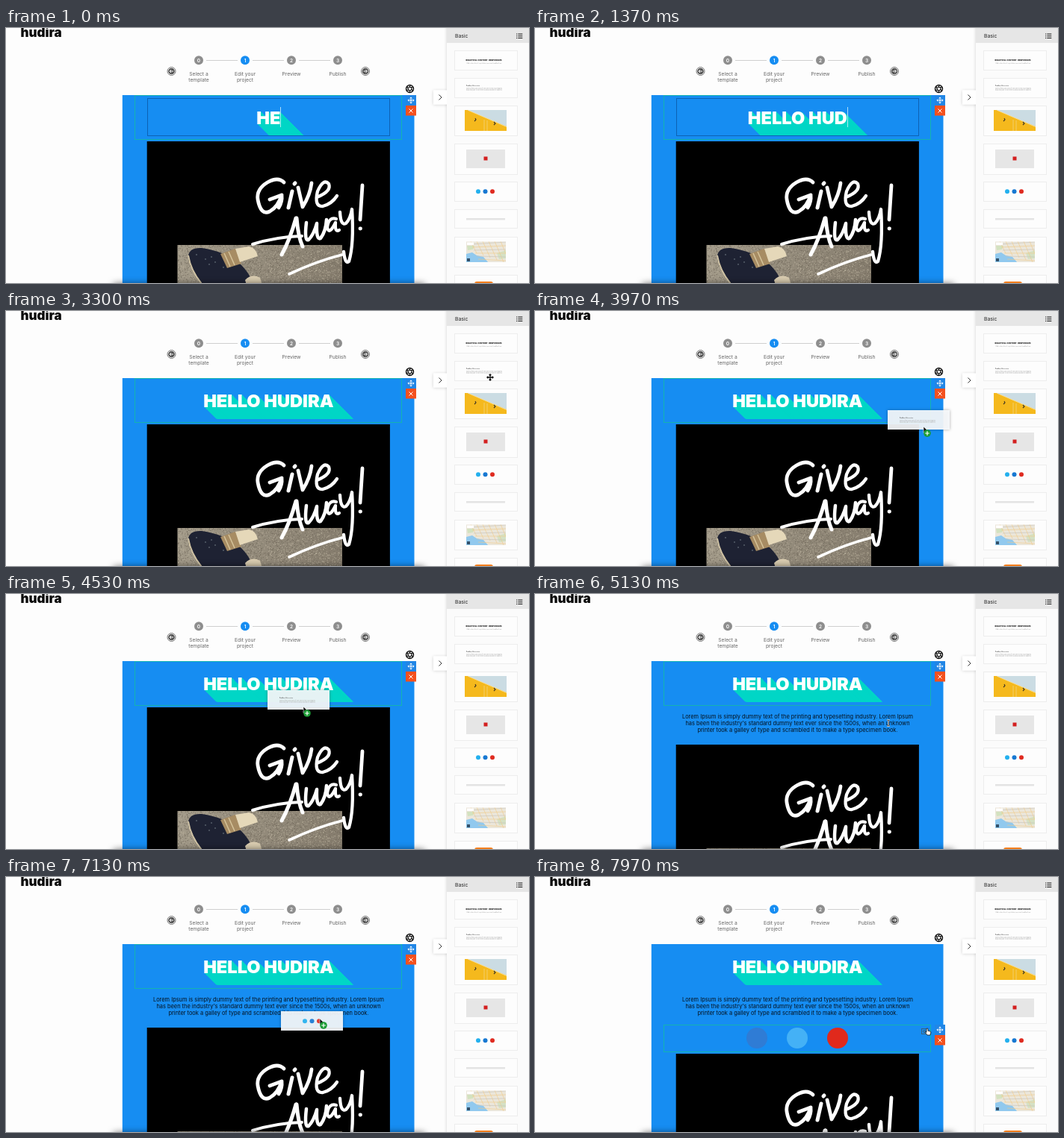
Recreate the animation shown at these times as an HTML page with a canvas. Size 700 by 342 pixels, loop 8 s.

```html
<!DOCTYPE html>
<html lang="en">
<head>
<meta charset="utf-8">
<title>Newsletter editor</title>
<style>
html, body { margin: 0; width: 100%; height: 100%; overflow: hidden; background: #fdfdfd; }
canvas { display: block; width: 700px; height: 342px; }
</style>
</head>
<body>
<canvas id="stage"></canvas>
<script>
const W = 700, H = 342, LOOP = 8000;
const BLUE = '#168df2', RED = '#f4511e', TEAL = '#00d6c6', GREEN = '#14b3b0';
const TITLE = 'HELLO HUDIRA';
const TITLE_FONT = '900 23.6px Inter, sans-serif';
const LOREM = [
  'Lorem Ipsum is simply dummy text of the printing and typesetting industry. Lorem Ipsum',
  "has been the industry's standard dummy text ever since the 1500s, when an unknown",
  'printer took a galley of type and scrambled it to make a type specimen book.'
];

// Times (ms) at which the letters after "HE" are typed
const KEYS = [100, 270, 390, 620, 850, 1030, 1220, 1400, 1570, 1740];
const BLUR = 2900, DROP_TEXT = 4560, DROP_SOCIAL = 7240, HOVER_SOCIAL = 7380;
const DRAGS = [
  { from: 3330, to: DROP_TEXT, dx: -48, dy: -22, draw: textCard },
  { from: 6420, to: DROP_SOCIAL, dx: -52, dy: -10, draw: socialCard }
];
// Pointer path: time, x, y
const PATH = [
  [2050, 440, 118], [2450, 497, 98], [2560, 497, 98], [3150, 648, 89], [3330, 648, 89],
  [3900, 522, 154], [3970, 520, 155], [4450, 398, 151], [4620, 398, 151], [5050, 473, 173],
  [5180, 473, 173], [6080, 652, 216], [6420, 652, 216], [7130, 420, 190], [7290, 420, 190],
  [7820, 524, 207], [8000, 524, 207]
];

const canvas = document.getElementById('stage');
const c = canvas.getContext('2d');
const ratio = window.devicePixelRatio || 1;
canvas.width = W * ratio;
canvas.height = H * ratio;

function rect(x, y, w, h, color) {
  c.fillStyle = color;
  c.fillRect(x, y, w, h);
}

function box(x, y, w, h, color) {
  c.strokeStyle = color;
  c.lineWidth = 1;
  c.strokeRect(x + 0.5, y + 0.5, w - 1, h - 1);
}

function disc(x, y, r, color) {
  c.fillStyle = color;
  c.beginPath();
  c.arc(x, y, r, 0, 7);
  c.fill();
}

function ring(x, y, r, color, width) {
  c.strokeStyle = color;
  c.lineWidth = width;
  c.beginPath();
  c.arc(x, y, r, 0, 7);
  c.stroke();
}

function line(d, color, width) {
  c.strokeStyle = color;
  c.lineWidth = width;
  c.stroke(new Path2D(d));
}

function shape(d, color) {
  c.fillStyle = color;
  c.fill(new Path2D(d));
}

function text(str, x, y, size, color, align = 'center', weight = 400) {
  c.font = `${weight} ${size}px Inter, sans-serif`;
  c.fillStyle = color;
  c.textAlign = align;
  c.fillText(str, x, y);
}

function at(x, y, draw) {
  c.save();
  c.translate(x, y);
  draw();
  c.restore();
}

function withShadow(color, blur, draw) {
  c.save();
  c.shadowColor = color;
  c.shadowBlur = blur * ratio;
  draw();
  c.restore();
}

function stepper() {
  const labels = [['Select a', 'template'], ['Edit your', 'project'], ['Preview'], ['Publish']];
  labels.forEach((rows, i) => {
    const x = 258 + i * 62;
    if (i < 3) line(`M${x + 10} 43.5H${x + 52}`, '#cfcfcf', 1);
    disc(x, 43.3, 6, i === 1 ? BLUE : '#8e8e8e');
    text(String(i), x, 45.7, 6.5, '#fff', 'center', 600);
    rows.forEach((row, j) => text(row, x, 64 + j * 8.3, 6.7, '#666'));
  });
  [[221.5, -1], [481, 1]].forEach(([x, dir]) => at(x, 58, () => {
    ring(0, 0, 5.5, '#777', 1);
    disc(0, 0, 4.3, '#555');
    c.scale(dir, 1);
    line('M-2.5 0H2.5M.4 -2.1L2.5 0L.4 2.1', '#fff', 1);
  }));
}

function aperture() {
  at(540.5, 81.5, () => {
    ring(0, 0, 5, '#111', 1.4);
    for (let i = 0; i < 6; i++) {
      line('M4.6 -1.5L-.8 -2.4', '#111', 1.1);
      c.rotate(Math.PI / 3);
    }
  });
}

function moveIcon(x, y, color, width) {
  at(x, y, () => {
    for (let i = 0; i < 4; i++) {
      line('M0 0V-4M-1.4 -2.7L0 -4.1L1.4 -2.7', color, width);
      c.rotate(Math.PI / 2);
    }
  });
}

function blockTools(y) {
  rect(535, y, 14, 14, '#2186e6');
  rect(535, y + 14, 14, 13.5, RED);
  moveIcon(542, y + 7, '#fff', 1);
  line(`M539.5 ${y + 18.5}l5 5m0 -5l-5 5`, '#fff', 1);
}

function heading(t) {
  const count = 2 + KEYS.filter(k => k <= t).length;
  const str = TITLE.slice(0, count);
  c.font = TITLE_FONT;
  c.textAlign = 'center';
  c.save();
  c.beginPath();
  c.rect(156, 90, 390, 54.5);
  c.clip();
  c.fillStyle = TEAL;
  for (let i = 34; i > 0; i -= 0.5) c.fillText(str, 351.3 + i, 128.5 + i);
  c.fillStyle = '#fff';
  c.fillText(str, 351.3, 128.5);
  const end = 351.3 + c.measureText(str).width / 2;
  c.restore();
  if (t < 2200) rect(Math.round(end), 106, 0.8, 27, '#d5f3fa');
}

function lettering() {
  c.lineCap = c.lineJoin = 'round';
  line('M372 207Q364 199 350 207Q335 216 337 230Q341 252 353 246Q364 240 369 224L353 230M369 224Q370 233 365 241', '#fff', 4.8);
  line('M383 219L378 241M386 209l1 -1', '#fff', 5);
  line('M391 214L397 240Q407 224 409 208', '#fff', 4.8);
  line('M416 227Q436 219 432 209Q425 201 417 219Q412 240 424 239Q436 236 443 225', '#fff', 4.3);
  line('M388 255Q380 284 369 304M389 255Q391 280 397 293', '#fff', 5);
  line('M330 290Q362 280 396 279', '#fff', 4);
  line('M402 261Q399 287 405 284Q412 277 416 262Q415 285 421 282Q428 273 429 257', '#fff', 4.5);
  line('M442 256Q432 253 430 267Q432 279 441 261Q440 275 446 271', '#fff', 4.2);
  line('M447 247Q448 266 455 262Q461 256 463 243Q466 290 459 313Q454 318 452 300', '#fff', 4.3);
  line('M379 330Q415 313 450 304', '#fff', 3.6);
  line('M477 211L474 257M474 269h.5', '#fff', 4.8);
  c.lineCap = 'butt';
  c.lineJoin = 'miter';
}

// Seeded specks for the concrete
function specks(seed, count) {
  const path = new Path2D();
  const next = () => (seed = seed * 16807 % 2147483647) / 2147483647;
  for (let i = 0; i < count; i++) path.rect(230 + next() * 219, 291 + next() * 50, 1, 1);
  return path;
}
const GRAIN = [[specks(7, 1200), '#b3aa97'], [specks(91, 1200), '#736b5d']];

// Hero picture, laid out for a top edge at y = 152
function hero(dy) {
  at(0, dy, () => {
    rect(188.7, 152, 325.2, 260, '#000');
    const stone = c.createLinearGradient(229, 291, 450, 342);
    stone.addColorStop(0, '#a29a89');
    stone.addColorStop(1, '#857c6d');
    rect(229.5, 291, 220.5, 121, stone);
    GRAIN.forEach(([path, color]) => {
      c.fillStyle = color;
      c.fill(path);
    });
    const deck = 'M244 305Q246 294 262 295Q292 299 314 317Q328 330 334 352L280 360Q250 335 244 305Z';
    shape(deck, '#1e2233');
    line('M244 305Q249 334 275 356', '#cfc2a4', 1.8);
    [[267, 310], [275, 307], [272, 317], [280, 314], [255, 304], [291, 321]]
      .forEach(([x, y]) => disc(x, y, 1.1, '#525a66'));
    shape('M287 303L307 296L315 316L296 322Z', '#a78c63');
    line('M292 302L300 320M298 300L306 318', '#d5c39a', 1.5);
    shape('M307 296L325 293Q335 295 337 306L313 314Z', '#e5d8b9');
    shape('M320 338Q329 329 340 335L343 345H322Z', '#d9ccb0');
    lettering();
  });
}

function socialRow() {
  ['#2f7cd5', '#44b1f6', '#e0291c'].forEach((color, i) => disc(297 + i * 54, 216, 14, color));
}

function page(t) {
  const hasText = t >= DROP_TEXT, hasSocial = t >= DROP_SOCIAL;
  rect(155.8, 90, 390.7, 252, BLUE);
  heading(t);
  if (hasText) LOREM.forEach((row, i) => text(row, 351.5, 167.3 + i * 9, 7.42, '#06121e'));
  hero((hasText ? 50 : 0) + (hasSocial ? 35 : 0));
  if (hasSocial) socialRow();
  if (t < BLUR) box(189, 94, 325, 51, '#0d62b4');
  if (t < HOVER_SOCIAL) {
    box(172, 90, 358, 60, GREEN);
    blockTools(90);
  } else {
    box(172, 198, 358, 37, GREEN);
    blockTools(198);
    box(517, 203, 8, 8, '#38627f');
    ring(521, 207, 1.5, '#38627f', 1);
  }
}

// Card pictures use coordinates relative to the card's top left corner
function titleCard() {
  text('BEAUTIFUL CONTENT. RESPONSIVE.', 40, 13.5, 2.7, '#111', 'center', 800);
  text('Add a short line of copy below your main headline here', 40, 17.5, 1.8, '#999');
}

function textCard() {
  text('Headline of the section', 16, 11.2, 1.6, '#444', 'left', 700);
  text('Write a few short lines of text here to tell your readers', 16, 14.6, 1.9, '#aaa', 'left');
  text('what this part of the letter is about and why it matters', 16, 17.2, 1.9, '#aaa', 'left');
}

function photoCard() {
  rect(14, 6, 56, 28, '#f5b91d');
  shape('M18 6H70V28Z', '#cbdce3');
  line('M18 6L70 28.5', '#f8e7b2', 0.8);
  line('M40 19V34M44 20V34', '#f3d98d', 0.7);
  line('M28 17l1 2l-2 2M53 22l2 2l-2 2', '#3a3325', 1.1);
}

function videoCard() {
  rect(16, 8, 52, 25, '#e6e6e6');
  rect(39.5, 17.5, 5, 5, '#d32020');
}

function socialCard() {
  ['#23b0ee', '#1778d2', '#df2b20'].forEach((color, i) => disc(32 + i * 9.5, 13.2, 3, color));
}

function lineCard() {
  rect(16, 12, 52, 2.5, '#e3e3e3');
}

function mapCard() {
  c.beginPath();
  c.rect(16, 6.5, 53, 27.5);
  c.clip();
  rect(16, 6, 53, 29, '#ebe6da');
  shape('M16 23L24 21L30 25L39 27L46 35H16Z', '#91c9ee');
  shape('M17 12H27L25 17L18 18Z', '#d3e2c0');
  shape('M57 22L69 18V29L60 30Z', '#d5e1c4');
  for (let i = 0; i < 6; i++) {
    line(`M${22 + i * 8} 6L${30 + i * 9} ${22 + i * 3}`, '#f0c987', 0.6);
    line(`M${22 + i * 2} ${10 + i * 4}L69 ${7 + i * 5}`, i % 2 ? '#f0c987' : '#c5c2bb', 0.6);
  }
  rect(17, 7.5, 9, 3.5, '#fff');
  rect(17, 29, 4, 4, '#34516a');
}

function buttonCard() {
  c.fillStyle = '#f4801f';
  c.beginPath();
  c.roundRect(27, 9, 25, 9, 3);
  c.fill();
}

const CARDS = [
  [30, 27, titleCard], [67, 27, textCard], [104, 41, photoCard], [155, 42, videoCard],
  [206, 27, socialCard], [243, 26, lineCard], [280, 41, mapCard], [331, 27, buttonCard]
];

function sidebar() {
  withShadow('rgba(0,0,0,.18)', 4, () => {
    rect(572, 83.5, 20, 19, '#fff');
    rect(590, -5, 115, 352, '#fbfbfb');
  });
  rect(572, 83.5, 18, 19, '#fff');
  line('M579.5 89.5L583 93L579.5 96.5', '#333', 1);
  rect(590, 0, 110, 20, '#e6e6e6');
  text('Basic', 601, 12.7, 6.8, '#222', 'left');
  [8, 10.7, 13.4].forEach(y => {
    rect(683, y - 0.5, 1.2, 1.1, '#222');
    rect(685.3, y - 0.5, 6, 1.1, '#222');
  });
  CARDS.forEach(([y, h, draw]) => {
    rect(600, y, 85, h, '#fdfdfd');
    box(600, y, 85, h, '#ededed');
    at(600, y, draw);
  });
}

function pointerAt(t) {
  const i = PATH.findIndex((p, k) => k && t < p[0]);
  const [t0, x0, y0] = PATH[i - 1], [t1, x1, y1] = PATH[i];
  const u = (t - t0) / (t1 - t0), e = u * u * (3 - 2 * u);
  return [x0 + (x1 - x0) * e, y0 + (y1 - y0) * e];
}

function arrow() {
  const d = 'M0 0V8.5L2 6.7L3.4 9.8L4.9 9.1L3.5 6.1H6.2Z';
  shape(d, '#111');
  line(d, '#fff', 0.6);
}

function ibeam() {
  const d = 'M-2 -4Q0 -4 0 -3V3Q0 4 -2 4M2 -4Q0 -4 0 -3M0 3Q0 4 2 4';
  line(d, '#fff', 1.8);
  line(d, '#222', 0.9);
}

function hand() {
  const d = 'M-1 -3.5Q0 -4.5 1 -3.5V-.7L4 0Q5 .4 4.8 2L4 5H0L-3 1.2Q-2.4 .2 -1 1.4Z';
  shape(d, '#fff');
  line(d, '#111', 0.8);
}

function pointer(t) {
  if (t < PATH[0][0]) return;
  const [x, y] = pointerAt(t);
  const drag = DRAGS.find(d => t >= d.from && t < d.to);
  if (drag) {
    at(x + drag.dx, y + drag.dy, () => {
      c.globalAlpha = 0.92;
      withShadow('rgba(0,0,0,.35)', 4, () => rect(0, 0, 83, 26, '#f9fbfd'));
      drag.draw();
    });
    at(x, y, arrow);
    disc(x + 5, y + 9, 4.8, '#1c9c35');
    line(`M${x + 2.2} ${y + 9}h5.6m-2.8 -2.8v5.6`, '#fff', 1.2);
    return;
  }
  const inTitle = x < 514 && y > 94 && y < 145;
  const inText = t > DROP_TEXT && x > 189 && x < 514 && y > 158 && y < 188;
  if (x > 600) {
    moveIcon(x, y, '#fff', 2.4);
    moveIcon(x, y, '#111', 1.3);
  } else if (t > 7700) at(x + 1, y, hand);
  else at(x, y, inTitle || inText ? ibeam : arrow);
}

function bottomShade() {
  withShadow('rgba(0,0,0,.6)', 10, () => rect(144, 343, 416, 20, '#000'));
}

function draw(now) {
  const t = now % LOOP;
  c.setTransform(ratio, 0, 0, ratio, 0, 0);
  rect(0, 0, W, H, '#fdfdfd');
  text('hudira', 19.5, 12, 17, '#0b0b0b', 'left', 900);
  stepper();
  page(t);
  aperture();
  bottomShade();
  sidebar();
  pointer(t);
}

const start = performance.now();
function tick() {
  draw(performance.now() - start);
  requestAnimationFrame(tick);
}
tick();
</script>
</body>
</html>
```
